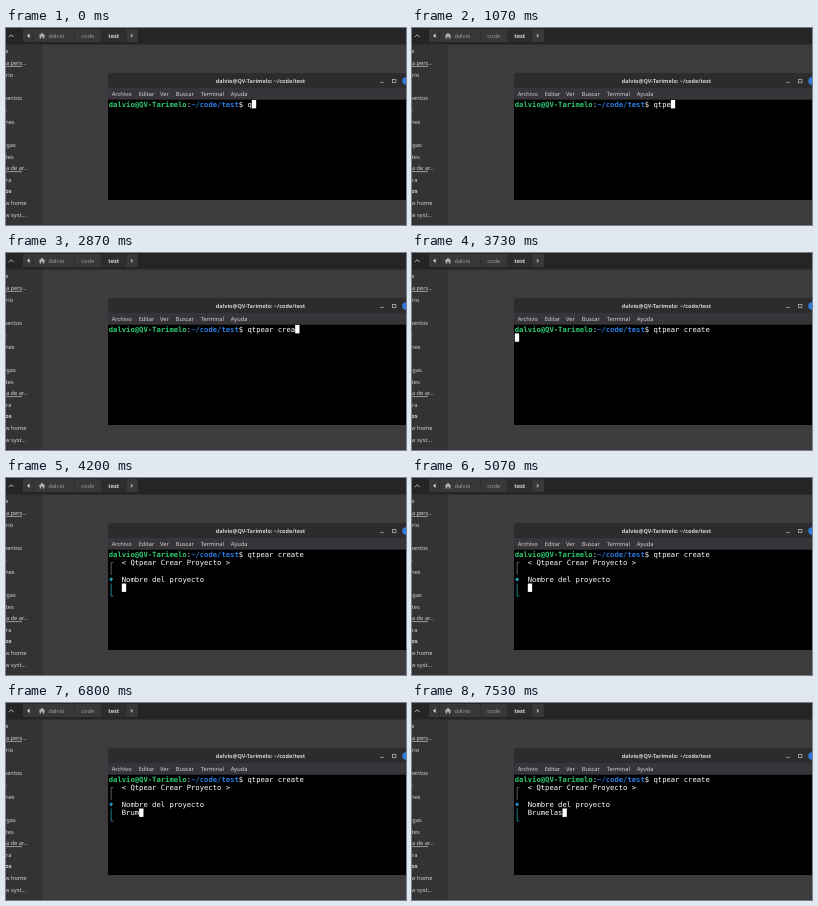
An HTML page for the animation above (8 s loop, 400 px wide and 197 px high).

```html
<!DOCTYPE html>
<html lang="es">
<head>
<meta charset="utf-8">
<title>Terminal</title>
<style>
  html, body { margin: 0; width: 100%; height: 100%; overflow: hidden; background: #3d3b3e; }
  svg { display: block; width: 100%; height: 100%; }
  text { white-space: pre; text-rendering: geometricPrecision; fill: #d2d1d3; }
  .ui { font: 5.7px "Noto Sans", sans-serif; }
  .ui .title { font-size: 5.5px; font-weight: 700; }
  .ui .dim { fill: #9b999d; }
  .bold { font-weight: 700; }
  .mono { font: 7.2px "DejaVu Sans Mono", monospace; }
  .mono text { fill: #fff; }
  .mono .user { fill: #2ccb70; font-weight: 700; }
  .mono .path { fill: #2a7bde; font-weight: 700; }
</style>
</head>
<body>
<svg viewBox="0 0 400 197" preserveAspectRatio="none">
  <!-- file manager -->
  <rect width="400" height="197" fill="#3d3b3e"/>
  <rect y="16" width="36" height="181" fill="#343235"/>
  <rect width="400" height="16.5" fill="#252427"/>
  <path d="M2.8 9.1 5.2 6.7 7.6 9.1" fill="none" stroke="#c4c3c5" stroke-width=".9"/>
  <rect x="17" y="1" width="115" height="13" rx="1.5" fill="#39373a"/>
  <rect x="95.5" y="1" width="24.5" height="13" fill="#2e2c2f"/>
  <path d="M27.5 1V14M68.5 1V14M95.5 1V14M120 1V14" stroke="#2b292c" stroke-width=".6"/>
  <path d="M23.6 5.6V10L21 7.8z" fill="#d2d1d3"/>
  <path d="M124.8 5.6V10L127.4 7.8z" fill="#9b999d"/>
  <path d="M32.6 7.9 36 4.8 39.4 7.9H38.4V10.6H36.8V8.8H35.2V10.6H33.6V7.9z" fill="#b0afb2"/>
  <g class="ui">
    <text class="dim" x="42.4" y="9.9">dalvio</text>
    <text class="dim" x="75.3" y="9.9">code</text>
    <text class="bold" x="102.2" y="9.9">test</text>
  </g>
  <g class="ui" id="sidebar"></g>
  <path d="M0 38.4H16M0 143.6H16" stroke="#b9b8ba" stroke-width=".8"/>

  <!-- terminal window -->
  <path d="M102 172V48a3 3 0 0 1 3-3H400V172z" fill="#2d2b2e"/>
  <rect x="102" y="60" width="298" height="12" fill="#37353a"/>
  <rect x="102" y="71.7" width="298" height="100.3" fill="#000"/>
  <g class="ui">
    <text class="title" x="254.5" y="55.2" text-anchor="middle">dalvio@QV-Tarimelo: ~/code/test</text>
    <g id="menu"></g>
  </g>
  <path d="M374.2 54.4H377.8" stroke="#a9a8ab" stroke-width=".8"/>
  <rect x="386.6" y="51.4" width="3.3" height="3.3" fill="none" stroke="#b9b8ba" stroke-width=".7"/>
  <circle cx="400" cy="53" r="3.7" fill="#2f7de0"/>

  <g class="mono">
    <g id="prompt"></g>
    <text id="command"></text>
    <g id="intro">
      <path d="M107.3 84.6H105.1V97.1" fill="none" stroke="#77757d" stroke-width=".8"/>
    </g>
    <g id="question">
      <path id="mark" d="M105.1 99.2 107.1 101.3 105.1 103.4 103.1 101.3z"/>
      <path d="M105.1 105.5V118H107.3" fill="none" stroke="#2aa1b3" stroke-width=".8"/>
    </g>
    <text id="answer"></text>
    <rect id="cursor" fill="#fff"/>
  </g>
</svg>
<script>
const LOOP = 8000;
const CELL = { w: 4.334, h: 8.38, left: 102.8, top: 72, ascent: 6.8 };
const PROMPT_COLS = 32, INDENT = 3;
const COMMAND = "qtpear create", ANSWER = "Brumelas";
const COMMAND_KEYS = [0, 270, 730, 1070, 1270, 1730, 1930, 2130, 2400, 2670, 2870, 3070, 3200];
const ANSWER_KEYS = [5930, 6400, 6600, 6800, 7000, 7200, 7330, 7530];
const ENTER = 3730, INTRO = 4000, QUESTION = 4130, MARK_CHANGE = 5130;

const $ = id => document.getElementById(id);
const colX = col => CELL.left + col * CELL.w;
const rowY = row => CELL.top + row * CELL.h;

function addText(parent, content, x, y, cls = "") {
  const el = document.createElementNS("http://www.w3.org/2000/svg", "text");
  el.setAttribute("x", x);
  el.setAttribute("y", y);
  el.setAttribute("class", cls);
  el.textContent = content;
  $(parent).append(el);
}

const addCells = (parent, content, col, row, cls) =>
  addText(parent, content, colX(col), rowY(row) + CELL.ascent, cls);

function place(id, col, row) {
  $(id).setAttribute("x", colX(col));
  $(id).setAttribute("y", rowY(row) + CELL.ascent);
}

// Sidebar labels run off the left edge; an empty entry leaves a gap.
["Carpeta pers…", "Escritorio", "", "Documentos", "Música", "Imágenes", "Vídeos",
 "Descargas", "Recientes", "Sistema de ar…", "Papelera"]
  .forEach((label, i) => addText("sidebar", label, -18, 37 + i * 11.7));
addText("sidebar", "Mi equipo", -26, 25.3, "bold");
addText("sidebar", "Otros", -10.2, 165.4, "bold");
addText("sidebar", "New home", -8.3, 177.2);
addText("sidebar", "New syst…", -8.3, 188.8);

[["Archivo", 105.7], ["Editar", 132.7], ["Ver", 153.9], ["Buscar", 169.7], ["Terminal", 194.7], ["Ayuda", 224.7]]
  .forEach(([label, x]) => addText("menu", label, x, 68.2));

addCells("prompt", "dalvio@QV-Tarimelo", 0, 0, "user");
addCells("prompt", ":", 18, 0);
addCells("prompt", "~/code/test", 19, 0, "path");
addCells("prompt", "$", 30, 0);
addCells("intro", "< Qtpear Crear Proyecto >", INDENT, 1);
addCells("question", "Nombre del proyecto", INDENT, 3);
place("command", PROMPT_COLS, 0);
place("answer", INDENT, 4);
$("cursor").setAttribute("width", CELL.w);
$("cursor").setAttribute("height", CELL.h);

const typed = (keys, t) => keys.filter(k => k <= t).length;
const show = (id, on) => $(id).setAttribute("visibility", on ? "visible" : "hidden");

function cursorCell(t, commandLength, answerLength) {
  if (t < ENTER) return [PROMPT_COLS + commandLength, 0];
  if (t < INTRO) return [0, 1];
  if (t < QUESTION) return [0, 2];
  return [INDENT + answerLength, 4];
}

function draw(t) {
  const commandLength = typed(COMMAND_KEYS, t);
  const answerLength = typed(ANSWER_KEYS, t);
  $("command").textContent = COMMAND.slice(0, commandLength);
  $("answer").textContent = ANSWER.slice(0, answerLength);
  show("intro", t >= INTRO);
  show("question", t >= QUESTION);
  $("mark").setAttribute("fill", t < MARK_CHANGE ? "#2aa1b3" : "#2a8ac4");
  const [col, row] = cursorCell(t, commandLength, answerLength);
  $("cursor").setAttribute("x", colX(col));
  $("cursor").setAttribute("y", rowY(row));
}

const start = performance.now();
function frame() {
  draw((performance.now() - start) % LOOP);
  requestAnimationFrame(frame);
}
frame();
</script>
</body>
</html>
```
